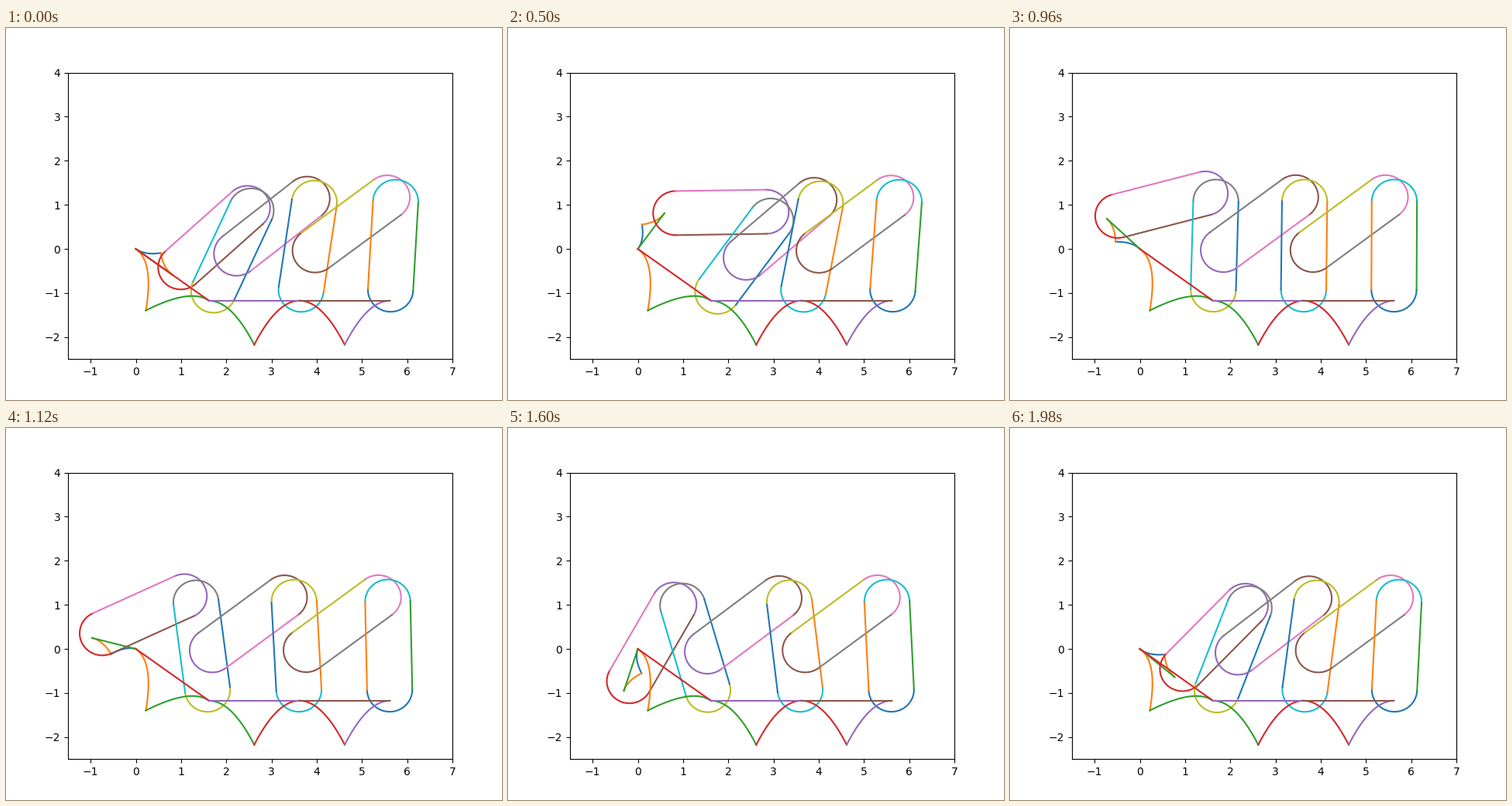
A matplotlib script that plays this animation: 640 px wide and 480 px high, repeating every 2 s.

```python
import numpy as np
import matplotlib.pyplot as plt
from matplotlib.animation import FuncAnimation

FRAMES, INTERVAL = 100, 20
CRANK, BASE, BAR = 1.0, 2.0, 2.5
TILT = -np.pi / 5


def bow(length, side):
    """Two half parabolas bulging to one side, plus the straight chord."""
    s = np.linspace(0, length / 2, 60)
    y = side * 1j * s**2
    return [s + y, length - s + y, np.array([0, length])]


def capsule(length, r=0.5, inset=0.25):
    """Round ends first, then the right and left edges."""
    cap = r * np.exp(1j * np.linspace(-np.pi / 2, np.pi / 2, 60))
    ends = np.array([inset, length - inset])
    return [inset - cap, length - inset + cap, ends - r * 1j, ends + r * 1j]


CRANK_SHAPE = bow(CRANK, 1)
BASE_SHAPE = bow(BASE, -1)
BAR_SHAPE = capsule(BAR)


def place(shape, start, end):
    turn = (end - start) / abs(end - start)
    return [start + turn * part for part in shape]


def apex(a, b):
    """Point at one bar length from both a and b, left of a -> b."""
    half = (b - a) / 2
    rise = np.sqrt(BAR**2 - abs(half)**2)
    return a + half + 1j * half / abs(half) * rise


# Fixed pivots, held as complex numbers
first = BASE * np.exp(1j * TILT)
PIVOTS = [0j, first, first + BASE, first + 2 * BASE]


def linkage(frame):
    tip = CRANK * np.exp(1j * (TILT + 2 * np.pi * frame / FRAMES))
    parts = place(CRANK_SHAPE, 0j, tip)
    for left, right in zip(PIVOTS, PIVOTS[1:]):
        pin = apex(tip, right)
        parts += place(BAR_SHAPE, tip, pin)
        parts += place(BAR_SHAPE, pin, right)
        parts += place(BASE_SHAPE, left, right)
        # Each rocker drives the next stage
        tip = right + CRANK * (pin - right) / BAR
    return parts


fig, ax = plt.subplots(figsize=(6.4, 4.8), dpi=100)
ax.set_xlim(-1.5, 7)
ax.set_ylim(-2.5, 4)
lines = [ax.plot(p.real, p.imag)[0] for p in linkage(0)]


def update(frame):
    for line, p in zip(lines, linkage(frame)):
        line.set_data(p.real, p.imag)
    return lines


anim = FuncAnimation(fig, update, frames=FRAMES, interval=INTERVAL, repeat=True)
plt.show()
```
